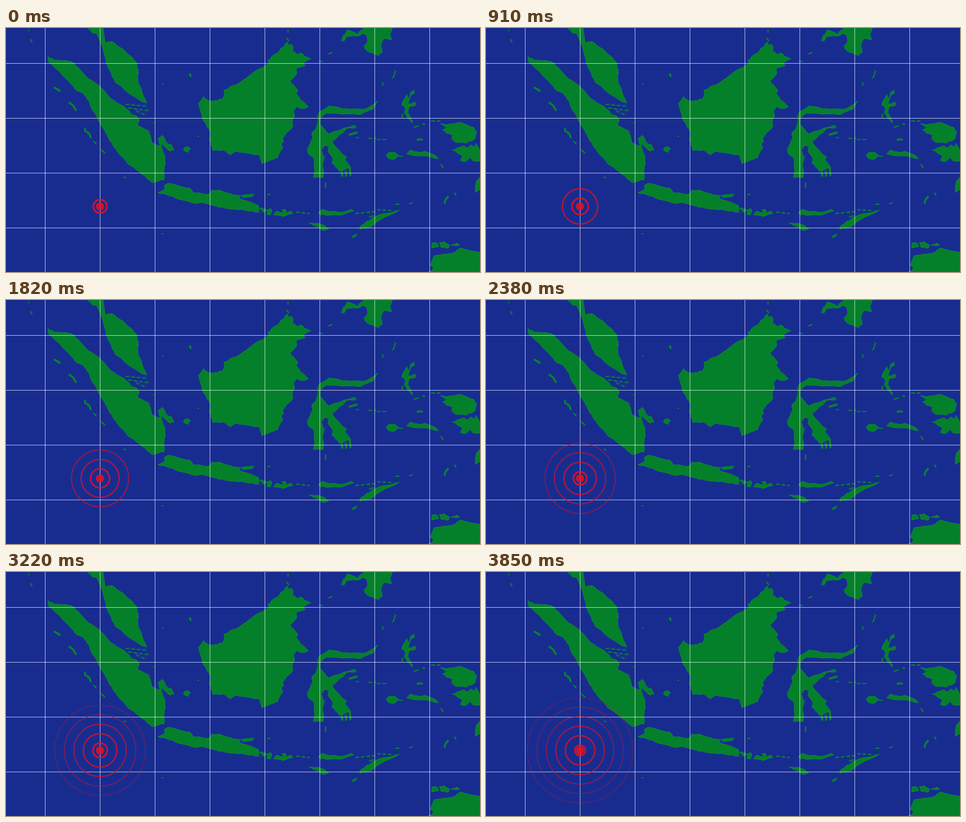
These frames come from a looping animation (768x396 px, 3.92 s). An HTML page:

```html
<!DOCTYPE html>
<html lang="en">
<head>
<meta charset="utf-8">
<title>Earthquake map</title>
<style>
html, body { margin: 0; width: 100%; height: 100%; overflow: hidden; background: #182c90; }
svg { display: block; }
polygon { fill: #04802a; stroke: #169036; stroke-width: .7; stroke-linejoin: round; }
.isles { fill: none; stroke: #07822d; stroke-width: 2.2; stroke-linecap: round; }
.wide { stroke-width: 3.4; }
.chain { stroke-dasharray: 4 5; }
.grid { stroke: #fff; stroke-opacity: .62; }
.ring { fill: none; stroke: #e8101c; }
.dot { fill: #e8101c; fill-opacity: .87; }
</style>
</head>
<body>
<svg width="768" height="396" viewBox="0 0 768 396">
  <!-- Sumatra, Malay Peninsula -->
  <polygon points="68,46 79,52 98,53 107,55 121,69 131,80 152,94 170,115 192,128 203,140 212,143 216,149 213,158 231,167 236,186 250,192 258,210 256,246 237,251 211,230 197,220 178,197 157,162 143,137 132,116 125,106 115,102 98,83 77,62 68,54"/>
  <polygon points="132,0 140,8 147,9 156,30 162,55 177,88 195,103 219,119 228,121 214,88 214,68 211,55 203,46 180,28 172,22 161,24 157,0"/>
  <!-- Borneo -->
  <polygon points="312,122 320,111 324,115 333,119 351,115 354,108 353,101 381,87 401,72 427,57 424,53 443,37 456,23 458,30 461,26 465,30 464,37 472,43 478,40 483,45 494,50 481,57 485,61 470,66 471,75 460,87 468,95 473,102 470,107 477,116 490,128 478,131 470,128 466,135 468,141 464,150 465,159 448,179 450,184 446,188 449,194 440,210 414,220 411,207 391,203 379,202 372,200 364,206 352,198 335,199 330,181 332,170 318,146 315,133"/>
  <!-- Sulawesi -->
  <polygon points="602,118 592,126 578,132 548,131 524,126 509,135 505,142 506,150 502,164 495,171 497,179 488,196 490,205 499,211 500,230 498,243 514,243 515,232 513,221 516,210 511,198 518,190 523,193 522,201 530,212 528,219 541,233 559,226 549,214 552,209 544,204 528,185 552,163 567,162 566,158 546,163 523,172 509,156 509,147 520,138 575,140 594,132"/>
  <!-- Java, Madura -->
  <polygon points="246,267 256,263 257,255 262,252 287,258 298,260 303,267 328,270 334,263 347,263 359,268 378,272 380,278 400,284 409,288 410,299 345,291 318,283 310,285 280,278 258,269"/>
  <polygon points="380,272 388,270 402,270 398,274 384,275"/>
  <!-- Lesser Sundas -->
  <polygon points="410,292 419,293 423,296 418,300"/>
  <polygon points="424,295 429,293 431,298 428,304 422,303"/>
  <polygon points="433,303 438,297 450,300 447,295 452,294 456,300 462,297 465,301 449,306"/>
  <polygon points="506,299 512,294 524,298 545,299 560,294 563,297 543,304 509,303"/>
  <polygon points="491,316 509,318 517,321 523,327 515,329 500,321"/>
  <polygon points="573,327 575,321 584,314 605,303 637,296 610,309 591,323"/>
  <!-- Mindanao -->
  <polygon points="543,21 546,13 553,3 570,10 580,0 626,0 622,11 625,19 612,17 608,25 609,40 604,45 585,37 580,29 586,22 585,13 578,9 572,13 552,14 549,20"/>
  <!-- Moluccas -->
  <polygon points="656,104 661,101 662,106 656,109 651,123 664,121 663,126 653,128 651,137 659,152 657,154 645,137 647,129 641,124 649,108 652,115"/>
  <polygon points="649,204 655,198 672,202 680,200 696,207 701,212 683,208 660,207"/>
  <polygon points="616,206 620,202 630,202 637,207 630,213 620,212"/>
  <!-- New Guinea -->
  <polygon points="704,155 715,157 735,153 757,161 763,169 760,180 746,187 728,185 722,179 724,174 714,171 707,165 714,162"/>
  <polygon points="723,198 742,191 749,195 752,190 758,193 761,187 768,199 768,216 757,216 752,210 744,217 736,215 740,207"/>
  <polygon points="768,242 762,249 760,267 768,262"/>
  <!-- Australia and Tiwi -->
  <polygon points="683,396 693,390 687,385 693,370 713,367 727,364 735,357 755,362 768,364 768,396"/>
  <polygon points="690,357 690,349 697,348 701,355"/>
  <polygon points="702,348 710,347 719,352 717,357 705,356"/>
  <polygon points="721,352 732,349 735,353"/>
  <!-- Bangka, Belitung -->
  <polygon points="246,180 254,174 261,187 268,189 272,198 265,200 250,187"/>
  <polygon points="288,195 294,192 299,196 295,202 288,199"/>
  <!-- Small islands -->
  <g class="isles">
    <path class="wide" d="M79 97l8 5M104 122l5 4 4 7M128 164l1 4M132 169l4 4 1 4M249 184l2 9M544 234l1 6"/>
    <path class="wide" d="M551 233v7M557 227l1 12M557 173l11-3M711 284l1-5 4-5M298 75l1 3M667 181h7M562 339l5-3"/>
    <path d="M40 19l2 4M36 4h1M102 121l3 3M142 184l4 4M155 198l5 5M192 242l2 1M254 91h1M311 176h1M240 154h1"/>
    <path class="chain" d="M195 124l35 3M199 130l32 4M212 135l16 7"/>
    <path class="chain" d="M471 299l20 2M567 301l31-3M602 295l21 1M588 179h11M602 181h17M690 151h18M638 208h9"/>
    <path d="M518 251v8M508 54h4M523 42l5-2M627 81l4-11M610 89l1 4M642 140v5M661 161l7-2M675 156h3M589 307l6-2"/>
    <path d="M705 222l3 4M727 268l2 3M632 286h5M654 285l4-1M457 4v2M455 17l3 3M424 270h3M253 334h1M568 178h3"/>
  </g>
  <g class="grid" id="grid"></g>
  <g id="rings"></g>
  <circle class="dot" cx="152.3" cy="289.5" r="6.6"/>
</svg>
<script>
const LOOP = 3920, STEP = 70;
const START = 11, SPEED = 0.01935, GAP = 15.4, COUNT = 6;

function add(parent, name, attrs) {
  const el = document.createElementNS('http://www.w3.org/2000/svg', name);
  for (const key in attrs) el.setAttribute(key, attrs[key]);
  return document.getElementById(parent).appendChild(el);
}

let seed = 7;
const jitter = () => {
  seed = (seed * 16807) % 2147483647;
  return seed / 2147483647 * 1.8 - 0.9;
};

// Break long straight edges into a slightly ragged coast.
function roughen(shape) {
  const pts = shape.getAttribute('points').split(' ').map(p => p.split(',').map(Number));
  const out = [];
  pts.forEach(([x, y], i) => {
    const [u, v] = pts[(i + 1) % pts.length];
    const parts = Math.ceil(Math.hypot(u - x, v - y) / 6);
    out.push([x, y]);
    for (let k = 1; k < parts; k++) {
      const f = k / parts;
      out.push([x + (u - x) * f + jitter(), y + (v - y) * f + jitter()]);
    }
  });
  shape.setAttribute('points', out.join(' '));
}
document.querySelectorAll('polygon').forEach(roughen);

for (let i = 0; i < 8; i++) {
  const x = 63.5 + i * 89;
  add('grid', 'line', { x1: x, x2: x, y1: 0, y2: 396 });
}
for (let i = 0; i < 4; i++) {
  const y = Math.floor(57 + i * 89.3) + 0.5;
  add('grid', 'line', { x1: 0, x2: 768, y1: y, y2: y });
}

const rings = Array.from({ length: COUNT }, () =>
  add('rings', 'circle', { class: 'ring', cx: 152.5, cy: 289.5 }));

function draw(now) {
  const t = Math.floor((now % LOOP) / STEP) * STEP;
  rings.forEach((ring, i) => {
    const r = START + SPEED * t - GAP * i;
    ring.setAttribute('r', Math.max(r, 0));
    ring.setAttribute('stroke-width', Math.max(1.1, 2.9 - r / 38));
    ring.setAttribute('stroke-opacity', r > 0 ? Math.max(0, 0.95 - r / 150) : 0);
  });
}

const begin = performance.now();
function tick() {
  draw(performance.now() - begin);
  requestAnimationFrame(tick);
}
tick();
</script>
</body>
</html>
```
